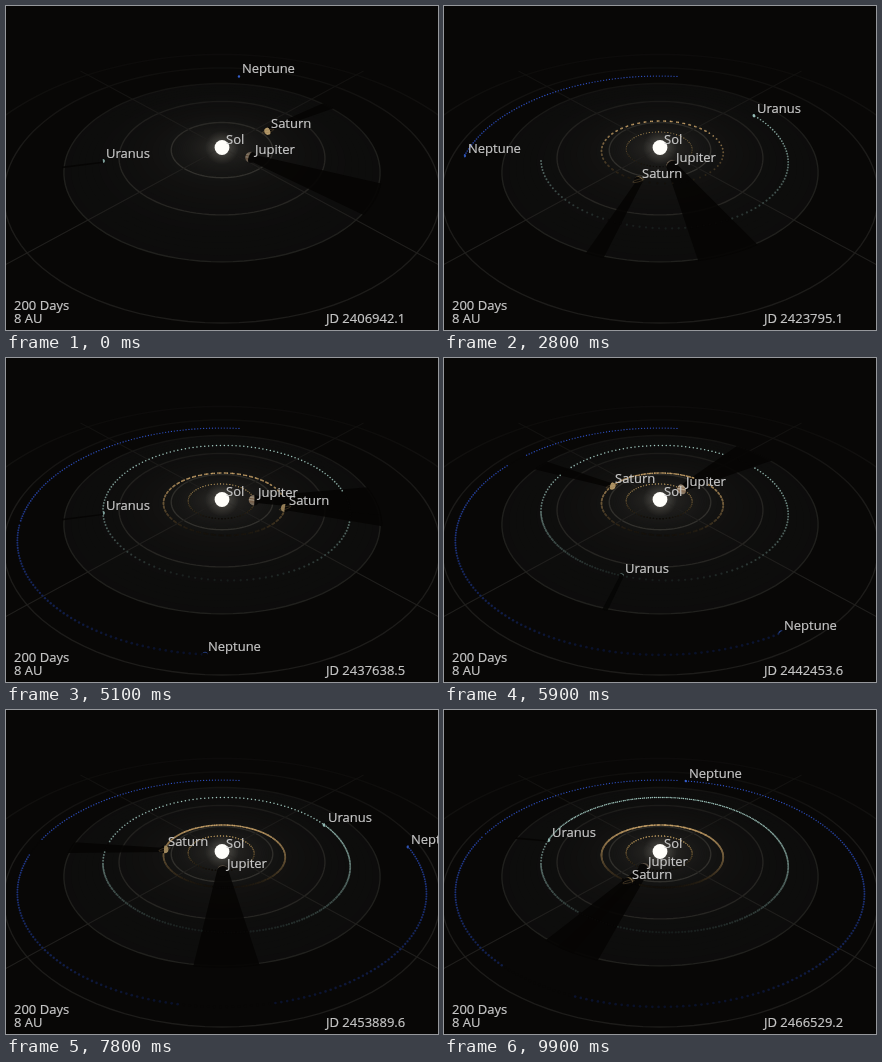
Write an HTML page that moves like this. It is 432 by 324 pixels and loops after 10 s.

```html
<!DOCTYPE html>
<html lang="en">
<head>
<meta charset="utf-8">
<title>Outer planets</title>
<style>
  html, body { margin: 0; width: 100%; height: 100%; overflow: hidden; background: #080706; }
  svg { display: block; width: 432px; height: 324px; }
  text { font: 13px "Open Sans", "Noto Sans", sans-serif; fill: #c8c8c8; stroke: #c8c8c8; stroke-width: 0.2px; }
</style>
</head>
<body>
<svg id="stage" viewBox="0 0 432 324">
  <defs>
    <radialGradient id="halo">
      <stop offset="0.4" stop-color="#fff6e0" stop-opacity="0.12"/>
      <stop offset="1" stop-color="#fff6e0" stop-opacity="0"/>
    </radialGradient>
    <linearGradient id="fade" gradientUnits="userSpaceOnUse" x1="0" y1="60" x2="0" y2="150">
      <stop offset="0" stop-color="#555"/>
      <stop offset="1" stop-color="#fff"/>
    </linearGradient>
    <mask id="distance" maskUnits="userSpaceOnUse" x="0" y="0" width="432" height="324">
      <rect width="432" height="324" fill="url(#fade)"/>
    </mask>
    <linearGradient id="bands" gradientUnits="userSpaceOnUse" x1="0.8" y1="-5" x2="-0.8" y2="5">
      <stop offset="0.05" stop-color="#8d7c6a"/>
      <stop offset="0.3" stop-color="#c5b296"/>
      <stop offset="0.4" stop-color="#8f6f52"/>
      <stop offset="0.52" stop-color="#cdbda4"/>
      <stop offset="0.66" stop-color="#94765a"/>
      <stop offset="0.9" stop-color="#9b8a76"/>
    </linearGradient>
  </defs>
</svg>
<script>
const STEP_MS = 100, STEPS = 100;
const START_JD = 2406942.135, DAYS_PER_STEP = 601.89, TRAIL_DAYS = 200;
const RAD = Math.PI / 180;
const SUN = { x: 216, y: 141.5 };
const BACK = '#080706';
const PLANE_EDGE = 24;

// Camera: pitch below horizontal, distance to the sun in AU, pixels per AU.
const SIN = 0.579, COS = 0.815, DIST = 69.3, SCALE = 6.32;
const CAMERA = [0, -58.4, 37.5];

// a, e, i, mean longitude at J2000, perihelion, node, degrees per century
const planets = [
  { name: 'Neptune', orbit: [30.0699, 0.0086, 1.770, 304.880, 44.965, 131.784, 218.4595],
    radius: 0.27, dot: 0.86, rgb: [48, 84, 205], fill: '#3560d0' },
  { name: 'Uranus', orbit: [19.1892, 0.04726, 0.773, 313.238, 170.954, 74.017, 428.4820],
    radius: 0.3, dot: 0.9, rgb: [165, 205, 196], fill: '#a3cfc8' },
  { name: 'Saturn', orbit: [9.5367, 0.05386, 2.486, 49.954, 92.599, 113.662, 1222.4936],
    radius: 0.62, dot: 0.92, rgb: [200, 162, 105], fill: '#c8aa74' },
  { name: 'Jupiter', orbit: [5.2029, 0.04839, 1.304, 34.396, 14.728, 100.474, 3034.7461],
    radius: 0.85, dot: 0.58, rgb: [165, 135, 85], fill: 'url(#bands)' }
];

const stage = document.getElementById('stage');

function add(tag, attrs, parent = stage) {
  const node = document.createElementNS('http://www.w3.org/2000/svg', tag);
  set(node, attrs);
  parent.appendChild(node);
  return node;
}
function set(node, attrs) {
  for (const key in attrs) node.setAttribute(key, attrs[key]);
}
function label(x, y, content) {
  const node = add('text', { x, y });
  node.textContent = content;
  return node;
}

const dot3 = (p, q) => p[0] * q[0] + p[1] * q[1] + p[2] * q[2];
const unit = p => p.map(v => v / Math.hypot(...p));

function project([x, y, z]) {
  const depth = 1 + (y * COS - z * SIN) / DIST;
  return {
    x: SUN.x + SCALE * x / depth,
    y: SUN.y - (3.42 * y + 5.32 * z) / depth,
    scale: 1 / depth
  };
}

function position([a, e, incl, lon0, peri, node, rate], jd) {
  const mean = (lon0 + rate * (jd - 2451545) / 36525 - peri) * RAD;
  let ecc = mean;
  for (let k = 0; k < 5; k++) ecc -= (ecc - e * Math.sin(ecc) - mean) / (1 - e * Math.cos(ecc));
  const r = a * (1 - e * Math.cos(ecc));
  const anomaly = Math.atan2(Math.sqrt(1 - e * e) * Math.sin(ecc), Math.cos(ecc) - e);
  const lon = anomaly + peri * RAD;
  const angle = lon + Math.PI / 4;
  return [r * Math.cos(angle), r * Math.sin(angle),
    r * Math.sin(incl * RAD) * Math.sin(lon - node * RAD)];
}

// Cosine of the angle sun - point - camera: 1 is fully lit, -1 is dark.
const phase = p => dot3(unit(p.map(v => -v)), unit(CAMERA.map((v, k) => v - p[k])));

const polygon = points => 'M' + points.map(p => {
  const q = project(p);
  return q.x.toFixed(2) + ' ' + q.y.toFixed(2);
}).join('L') + 'Z';
const polar = (r, angle) => [r * Math.cos(angle), r * Math.sin(angle), 0];
const ring = r => polygon(Array.from({ length: 120 }, (_, k) => polar(r, k * 3 * RAD)));

function drawPlane() {
  add('rect', { width: 432, height: 324, fill: BACK });
  for (let r = PLANE_EDGE; r > 0.8; r -= r > 8 ? 1 : 0.3) {
    const level = 9 + 40 / (1 + (r / 4) ** 1.3);
    const rgb = [level, level * 0.98, level * 0.92].map(v => v.toFixed(1));
    add('path', { d: ring(r), fill: `rgb(${rgb})` });
  }
  const grid = add('g', { fill: 'none', mask: 'url(#distance)' });
  ['#31302c', '#262522', '#20201d', '#1d1c1a', '#171614'].forEach((stroke, k) =>
    add('path', { d: ring(8 * (k + 1)), stroke, 'stroke-width': 1.4 }, grid));
  for (const turn of [45, 135]) {
    add('path', { d: polygon([polar(43, turn * RAD), polar(43, (turn + 180) * RAD)]),
      stroke: '#201f1d', 'stroke-width': 1.1 }, grid);
  }
}

function makeTrail(planet) {
  const count = Math.floor((STEPS - 1) * DAYS_PER_STEP / TRAIL_DAYS) + 1;
  return Array.from({ length: count }, (_, k) => {
    const p = position(planet.orbit, START_JD + k * TRAIL_DAYS);
    const at = project(p);
    const lit = 0.52 * (1 + phase(p));
    const color = `rgb(${planet.rgb.map(v => Math.round(v * lit))})`;
    const node = add('circle', { cx: at.x, cy: at.y, r: planet.dot * at.scale });
    return { node, color, dir: unit(p), range: Math.hypot(...p) };
  });
}

function shadowPath(p, radius) {
  const r = Math.hypot(p[0], p[1]);
  if (r > PLANE_EDGE) return '';
  const half = Math.sqrt(Math.max(0, radius * radius - p[2] * p[2])) / r;
  const angle = Math.atan2(p[1], p[0]);
  const far = Array.from({ length: 7 }, (_, k) => polar(PLANE_EDGE + 0.3, angle + half * (k / 3 - 1)));
  return polygon([polar(r, angle - half), ...far, polar(r, angle + half)]);
}

function litPath(p, r) {
  const toSun = unit(p.map(v => -v));
  const angle = Math.atan2(-(toSun[1] * SIN + toSun[2] * COS), toSun[0]);
  const cosine = phase(p);
  const x = r * Math.sin(angle), y = -r * Math.cos(angle);
  return `M${x} ${y}A${r} ${r} 0 0 1 ${-x} ${-y}` +
    `A${r * Math.abs(cosine)} ${r} ${angle / RAD} 0 ${cosine > 0 ? 1 : 0} ${x} ${y}`;
}

drawPlane();
for (const planet of planets) planet.shadow = add('path', { fill: '#060504', opacity: 0.9 });
for (const planet of planets) planet.trail = makeTrail(planet);
add('circle', { cx: SUN.x, cy: SUN.y, r: 17, fill: 'url(#halo)' });
add('circle', { cx: SUN.x, cy: SUN.y, r: 7.4, fill: '#fffefa' });
for (const planet of planets) {
  planet.group = add('g', {});
  planet.disc = add('circle', { fill: '#080706' }, planet.group);
  planet.lit = add('path', { fill: planet.fill }, planet.group);
  if (planet.name === 'Saturn') {
    add('ellipse', { rx: 6, ry: 1.2, transform: 'rotate(-15.7)', fill: 'none',
      stroke: '#8d744c', 'stroke-width': 0.8, opacity: 0.4 }, planet.group);
  }
}
label(SUN.x + 4, 138, 'Sol');
for (const planet of planets) planet.label = label(0, 0, planet.name);
label(8, 304, '200 Days');
label(8, 317, '8 AU');
const clock = label(320, 317, '');

function draw(step) {
  const days = step * DAYS_PER_STEP;
  clock.textContent = 'JD ' + (START_JD + days).toFixed(1);

  const casters = planets.map(planet => {
    const p = position(planet.orbit, START_JD + days);
    const at = project(p);
    const r = planet.radius * SCALE * at.scale;
    set(planet.group, { transform: `translate(${at.x} ${at.y})` });
    set(planet.disc, { r });
    set(planet.lit, { d: litPath(p, r), opacity: 0.75 + 0.25 * phase(p) });
    set(planet.label, { x: Math.round(at.x + 2.8 + r / 5), y: Math.round(at.y - 3) });
    set(planet.shadow, { d: shadowPath(p, planet.radius) });
    const range = Math.hypot(...p);
    return { dir: unit(p), range, limit: Math.cos(planet.radius / range) };
  });

  for (const planet of planets) {
    planet.trail.forEach((mark, k) => {
      const shown = k * TRAIL_DAYS <= days;
      mark.node.style.display = shown ? '' : 'none';
      if (!shown) return;
      const dark = casters.some(c => mark.range > c.range + 0.8 && dot3(mark.dir, c.dir) > c.limit);
      set(mark.node, { fill: dark ? BACK : mark.color });
    });
  }
}

const began = performance.now();
let current = -1;
function tick() {
  const step = Math.floor((performance.now() - began) / STEP_MS) % STEPS;
  if (step !== current) draw(current = step);
  requestAnimationFrame(tick);
}
tick();
</script>
</body>
</html>
```
